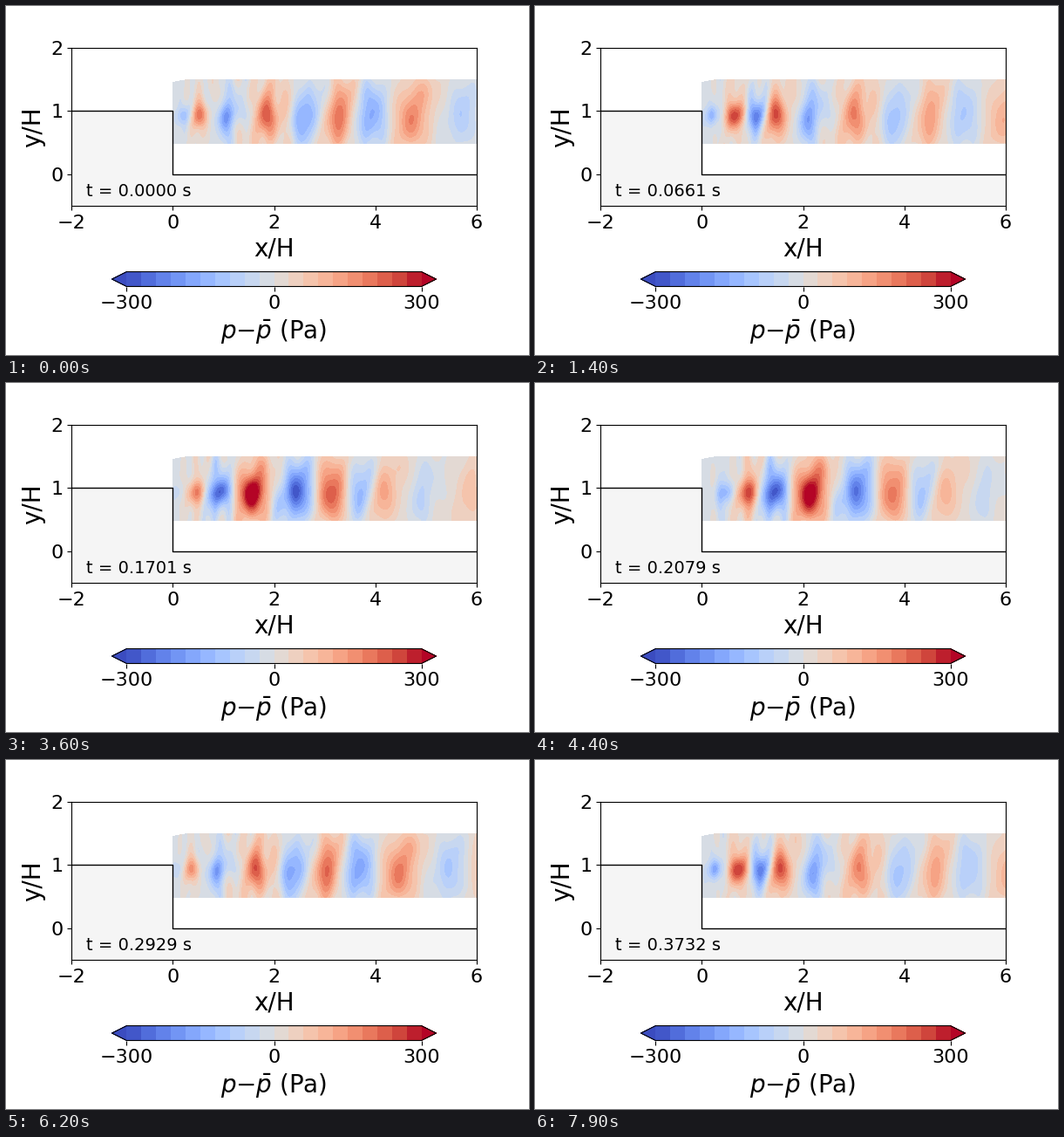
A matplotlib script for the animation above (8000 ms loop, 600x400 px).

```python
import numpy as np
import matplotlib.pyplot as plt
from matplotlib.animation import FuncAnimation

FRAMES, INTERVAL = 80, 100
STEP = 0.6 / 127           # physical seconds per frame
CYCLE = 64                 # the flow repeats after this many frames
SPAN = 7.47                # distance the eddy street travels in one cycle
EDDIES = 10
LEVELS = np.linspace(-300, 300, 21)

plt.rcParams["font.family"] = "DejaVu Sans"
rng = np.random.default_rng(4)

# Measured window, with its cut upper left corner
X, V = np.meshgrid(np.linspace(0, 6, 260), np.linspace(0, 1, 60))
Y = 0.49 + V * (np.minimum(1.5, 1.455 + 0.14 * X) - 0.49)


def travel(x):
    """Coordinate in which the flow, slower near the step, is uniform."""
    return x + 0.9 * (1 - np.exp(-x))


def growth(q):
    """Eddies grow behind the step, peak and slowly decay."""
    return q / 1.8 * np.exp(1 - q / 1.8)


def blob(x0, y0, width, height, lean=0.15):
    dy = Y - y0
    dx = X - x0 - lean * dy
    return np.exp(-(dx / width) ** 2 / 2 - (dy / height) ** 2 / 2)


Q = travel(X)
TRACK = np.linspace(0, 8, 2000)

# A street of alternating eddies, unevenly spaced and of uneven strength
k = np.arange(EDDIES)
wave = 2 * np.pi * k / EDDIES
START = 0.4 + SPAN / EDDIES * k - 0.18 * np.sin(2 * wave) - 0.1 * np.sin(wave)
STRENGTH = (-1.0) ** (k + 1) * (275 - 85 * np.sin(wave))
OFFSET = rng.uniform(-0.25, 0.25, (EDDIES, 2))

# Fine turbulence, carried along with the street
MODES = [(2 * np.pi * rng.integers(6, 22) / SPAN, rng.uniform(-9, 9),
          rng.uniform(0, 2 * np.pi)) for _ in range(14)]


def shift(n):
    """Distance travelled, with two gentle surges per cycle."""
    return SPAN * n / CYCLE - 0.2 * (1 - np.cos(4 * np.pi * n / CYCLE))


def pressure(n):
    moved = shift(n)
    p = -12 + 27 * (1 - np.exp(-X))
    for mode_x, mode_y, phase in MODES:
        p += 9 * growth(Q) * np.sin(mode_x * (Q - moved) + mode_y * Y + phase)
    for start, strength, offsets in zip(START, STRENGTH, OFFSET):
        q = (start + moved) % SPAN
        x = np.interp(q, travel(TRACK), TRACK)
        age = 1 - np.exp(-x / 2.2)
        width = 0.2 - 0.12 * np.exp(-x)
        height = 0.1 + 0.17 * age
        shape = 0.85 * blob(x, 0.93, width, height)
        shape += 0.3 * age * blob(x, 1, 1.7 * width, 0.55)
        for y, dx in zip((1.3, 0.62), offsets):
            shape += 0.35 * age * blob(x + dx * age, y, width, 0.16)
        p += strength * growth(q) * shape
    return p


fig = plt.figure(figsize=(6, 4), dpi=100)
ax = fig.add_axes([0.125, 0.4275, 0.775, 0.4525])
ax.set(xlim=(-2, 6), ylim=(-0.5, 2), xticks=range(-2, 7, 2), yticks=range(3))
ax.set_xlabel("x/H", fontsize=20)
ax.set_ylabel("y/H", fontsize=20)
ax.tick_params(labelsize=16)
wall_x, wall_y = [-2, 0, 0, 6], [1, 1, 0, 0]
ax.fill(wall_x + [6, -2], wall_y + [-0.5, -0.5], color="whitesmoke", lw=0)
ax.plot(wall_x, wall_y, color="black", lw=1)
clock = ax.text(-1.7, -0.35, "", fontsize=14)


def draw(n):
    for old in list(ax.collections):
        old.remove()
    clock.set_text(f"t = {n * STEP:.4f} s")
    return ax.contourf(X, Y, pressure(n), LEVELS, cmap="coolwarm", extend="both")


cax = fig.add_axes([0.2025, 0.19625, 0.62, 0.04225])
bar = fig.colorbar(draw(0), cax=cax, orientation="horizontal", ticks=[-300, 0, 300])
bar.ax.tick_params(labelsize=16)
bar.set_label("$p$\u2212$\\bar{p}$ (Pa)", fontsize=20)


def update(n):
    return draw(n), clock


anim = FuncAnimation(fig, update, frames=FRAMES, interval=INTERVAL, repeat=True)
plt.show()
```
